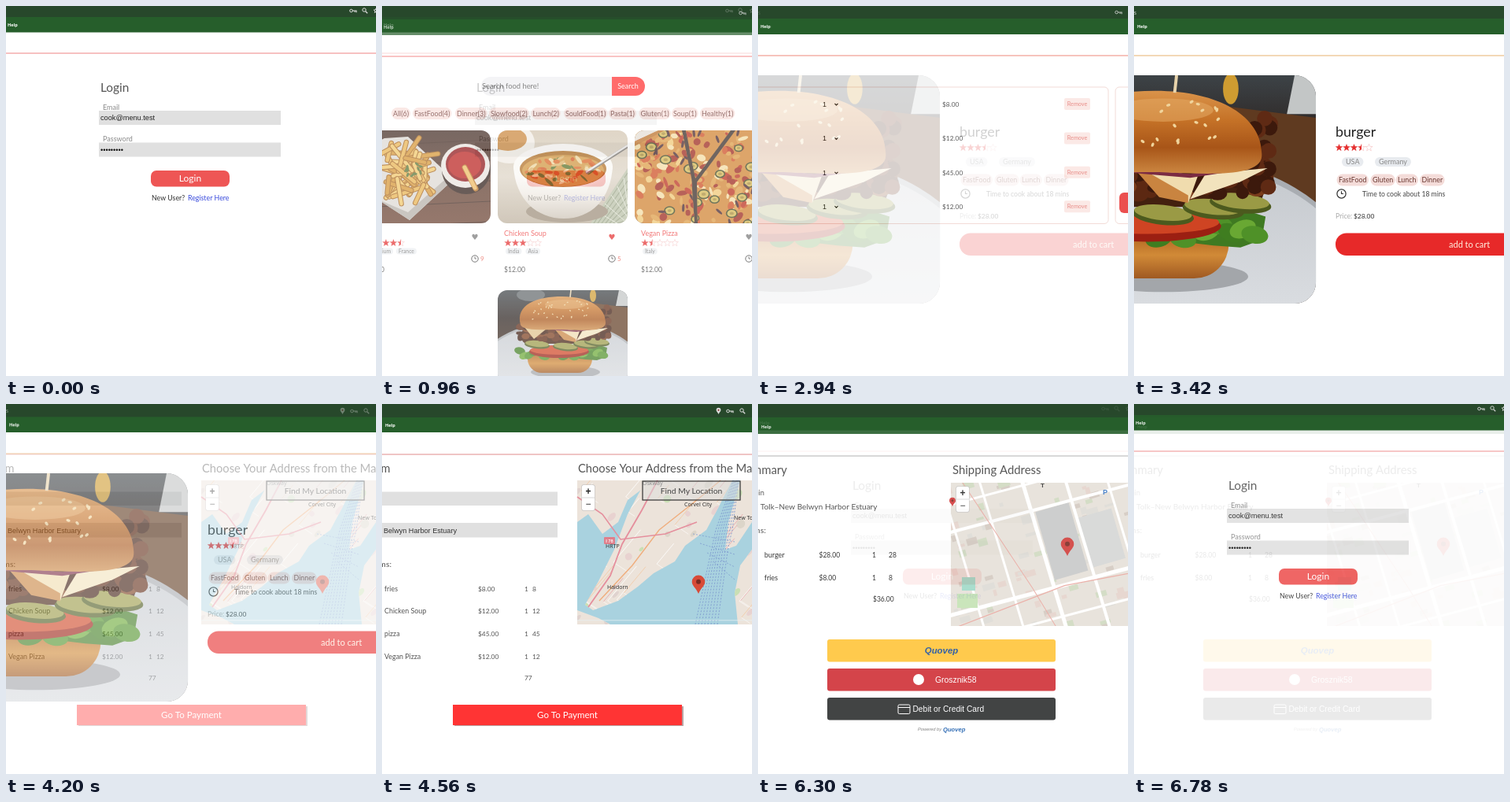
These frames come from a looping animation (470 px wide and 470 px high, 6840 ms). An HTML page with a canvas:

```html
<!DOCTYPE html>
<html lang="en">
<head>
<meta charset="utf-8">
<title>Food shop tour</title>
<style>
  html, body { margin: 0; width: 100%; height: 100%; overflow: hidden; background: #fff; }
  canvas { display: block; }
</style>
</head>
<body>
<canvas id="stage" width="470" height="470"></canvas>
<script>
const SIZE = 470, HOLD = 600, STEP = 60, SLIDE = 1140;
const UI = 'Lato, sans-serif', ARIAL = '"Liberation Sans", sans-serif';
const RED = '#e52f2f';
let c; // context of the slide being drawn

// ---- drawing helpers ----
function box(x, y, w, h, color, r = 0) {
  c.fillStyle = color;
  c.beginPath();
  c.roundRect(x, y, w, h, r);
  c.fill();
}
function oval(x, y, rx, ry, color, turn = 0) {
  c.fillStyle = color;
  c.beginPath();
  c.ellipse(x, y, rx, ry, turn, 0, 7);
  c.fill();
}
function ring(x, y, r, color, width = 1) {
  c.strokeStyle = color;
  c.lineWidth = width;
  c.beginPath();
  c.arc(x, y, r, 0, 7);
  c.stroke();
}
function trace(points) {
  c.beginPath();
  for (let i = 0; i < points.length; i += 2) c.lineTo(points[i], points[i + 1]);
}
function poly(color, ...points) {
  trace(points);
  c.fillStyle = color;
  c.fill();
}
function line(color, width, ...points) {
  trace(points);
  c.strokeStyle = color;
  c.lineWidth = width;
  c.stroke();
}
function text(str, x, y, size, color, align = 'left', font = UI, style = '') {
  c.font = `${style} ${size}px ${font}`;
  c.textAlign = align;
  c.fillStyle = color;
  c.fillText(str, x, y);
}
function pill(str, x, y, size, color, back, pad, h) {
  c.font = `${size}px ${UI}`;
  box(x - pad, y - h / 2, c.measureText(str).width + pad * 2, h, back, h / 2);
  text(str, x, y + size * .35, size, color);
}
function random(seed) {
  return (a = 0, b = 1) => {
    seed = (seed * 16807) % 2147483647;
    return a + (b - a) * seed / 2147483647;
  };
}
function gradient(y0, y1, ...colors) {
  const g = c.createLinearGradient(0, y0, 0, y1);
  colors.forEach((color, i) => g.addColorStop(i / (colors.length - 1), color));
  return g;
}
function clipped(x, y, w, h, r, draw) {
  c.save();
  c.beginPath();
  c.roundRect(x, y, w, h, r);
  c.clip();
  draw();
  c.restore();
}

// ---- shared parts ----
function header(dark, green, lineY, lineColor, helpX, helpY) {
  box(0, 0, SIZE, SIZE, '#fff');
  box(0, 0, SIZE, green, '#265e2b');
  box(0, 0, SIZE, dark, '#27482b');
  box(0, lineY - .5, SIZE, 1, lineColor);
  text('Help', helpX, helpY, 5.6, '#fff', 'left', '"Open Sans", sans-serif', 'bold');
}
function keyIcon(x, y) {
  ring(x - 2.5, y, 1.8, '#ddd');
  line('#ddd', 1.2, x - 1, y, x + 4, y, x + 4, y + 2.2);
  line('#ddd', 1, x + 2, y, x + 2, y + 2);
}
function lens(x, y) {
  ring(x - 1, y - 1, 2.2, '#ddd');
  line('#ddd', 1.3, x + .7, y + .7, x + 3.2, y + 3.2);
}
function pin(x, y, s, color) {
  c.fillStyle = color;
  c.beginPath();
  c.moveTo(x, y);
  c.bezierCurveTo(x - s * .15, y - s * .35, x - s * .36, y - s * .42, x - s * .36, y - s * .66);
  c.arc(x, y - s * .66, s * .36, Math.PI, 0);
  c.bezierCurveTo(x + s * .36, y - s * .42, x + s * .15, y - s * .35, x, y);
  c.fill();
  oval(x, y - s * .66, s * .13, s * .13, '#7c2a22');
}
function star(x, y, r) {
  const points = [];
  for (let i = 0; i < 10; i++) {
    const a = i * Math.PI / 5 - Math.PI / 2, d = i % 2 ? r * .42 : r;
    points.push(x + d * Math.cos(a), y + d * Math.sin(a));
  }
  trace(points);
  c.closePath();
}
function stars(x, y, r, rating) {
  for (let i = 0; i < 5; i++) {
    const sx = x + i * 9.5, part = Math.min(1, Math.max(0, rating - i));
    star(sx, y, r);
    c.strokeStyle = '#f2b3b3';
    c.lineWidth = .5;
    c.stroke();
    if (part) clipped(sx - r, y - r, 2 * r * part, 2 * r, 0, () => {
      star(sx, y, r);
      c.fillStyle = RED;
      c.fill();
    });
  }
}
function clock(x, y, r) {
  ring(x, y, r, '#333', r / 4.5);
  line('#333', r / 5, x, y - r * .6, x, y, x + r * .45, y);
}
function zoomControl(x, y) {
  box(x - .5, y - .5, 17, 33, '#bbb', 2);
  box(x, y, 16, 32, '#fff', 2);
  box(x, y + 15.6, 16, .8, '#ccc');
  text('+', x + 8, y + 12, 12, '#222', 'center', ARIAL, 'bold');
  text('−', x + 8, y + 28, 12, '#222', 'center', ARIAL);
}

// ---- food pictures, 165 by 118 ----
function fries() {
  const rnd = random(11);
  box(0, 0, 165, 118, gradient(0, 118, '#3f2820', '#5a382a', '#693f2e'));
  for (let y = 12; y < 118; y += 26) line('#3a221a', 1, 0, y + 8, 165, y);
  poly('#dcd8d2', 0, 26, 30, 10, 60, 8, 118, 62, 62, 114, 22, 88, 0, 84);
  poly('#b5afa8', 22, 88, 62, 114, 118, 62, 112, 58, 60, 104);
  c.lineCap = 'round';
  for (let i = 0; i < 46; i++) {
    const x = rnd(34, 82), y = rnd(24, 82), a = rnd(-.6, 2.3), d = rnd(10, 21);
    const ends = [x - d * Math.cos(a), y - d * Math.sin(a), x + d * Math.cos(a), y + d * Math.sin(a)];
    line('#a5641c', 6.5, ...ends);
    line(['#e8b14c', '#d59430', '#f0c566'][i % 3], 4.4, ...ends);
  }
  for (let i = 0; i < 12; i++) oval(rnd(56, 76), rnd(40, 58), 3, 1.5, '#55702f', rnd(0, 3));
  oval(134, 50, 31, 31, '#2a1812');
  oval(133, 45, 31, 28, '#e9e3de');
  oval(133, 43, 25, 22, '#8d1012');
  oval(132, 44, 21, 17, '#b81c19');
  line('#b56f22', 7, 132, 47, 146, 74);
  line('#edb95f', 5, 132, 47, 145, 73);
  c.lineCap = 'butt';
}
function soup() {
  const rnd = random(7);
  box(0, 0, 165, 118, gradient(0, 118, '#d3c5b0', '#ddd4c5', '#bdb09d'));
  oval(15, 16, 32, 26, '#f1ece4');
  oval(13, 11, 24, 15, '#c9863a');
  poly('#b9bfa6', 165, 48, 118, 118, 165, 118);
  for (let i = 0; i < 8; i++) line('#939d80', 1.2, 165, 54 + i * 10, 122 + i * 5, 118);
  for (let i = 0; i < 6; i++) line('#e1e4d4', 1, 128 + i * 8, 104 - i * 11, 165, 126 - i * 8);
  oval(88, 103, 52, 14, '#9c8d78');
  c.fillStyle = gradient(45, 115, '#ffffff', '#f1ece5', '#c9bfb1');
  c.beginPath();
  c.moveTo(20, 45);
  c.bezierCurveTo(22, 88, 50, 112, 84, 112);
  c.bezierCurveTo(118, 112, 144, 88, 146, 45);
  c.fill();
  oval(83, 46, 63, 29, '#faf8f4');
  oval(83, 49, 55, 23, '#b06d20');
  oval(83, 51, 52, 20, '#d0923a');
  for (let i = 0; i < 60; i++) {
    const a = rnd(0, 6.28), d = Math.sqrt(rnd());
    oval(83 + 47 * d * Math.cos(a), 51 + 16 * d * Math.sin(a), rnd(2, 7), rnd(1.2, 2.8),
      ['#ecd49a', '#cf4f16', '#dcb064', '#536d22', '#d8621f'][i % 5], rnd(-1, 1));
  }
  line('#77726c', 4, 112, 54, 165, 20);
  line('#e9e7e5', 2.6, 112, 53, 165, 19);
}
function pizza() {
  const rnd = random(23);
  box(0, 0, 165, 118, '#33251f');
  const slices = [[0, 0, 60, 0, 72, 60, 76, 118, 0, 118], [65, 0, 122, 0, 77, 61],
    [128, 0, 165, 0, 165, 118, 80, 118, 79, 66]];
  for (const slice of slices) {
    poly('#cf7f2c', ...slice);
    c.save();
    trace(slice);
    c.clip();
    for (let i = 0; i < 170; i++)
      oval(rnd(0, 165), rnd(0, 118), rnd(2, 8), rnd(1.5, 5),
        ['#efc670', '#b92a17', '#dc9a40', '#cc4a1c', '#f3dba0', '#9a2013'][i % 6], rnd(0, 3));
    for (let i = 0; i < 24; i++) {
      const x = rnd(0, 165), y = rnd(0, 118), r = rnd(5, 8);
      oval(x, y, r, r * .8, '#353d18');
      oval(x, y, r - 1.6, r * .8 - 1.5, '#d3b64e');
      oval(x, y, r * .35, r * .25, '#a88a34');
    }
    for (let i = 0; i < 20; i++) oval(rnd(0, 165), rnd(0, 118), 5, 1.6, '#3f1f25', rnd(0, 3));
    c.restore();
  }
  poly('#e3dcd2', 0, 0, 30, 0, 0, 14);
  poly('#b96c22', 0, 14, 30, 0, 38, 0, 0, 20);
}
function burger() {
  const rnd = random(5);
  box(0, 0, 165, 118, gradient(0, 70, '#3d4347', '#2a211e', '#3f291c'));
  poly('#5f3a20', 118, 16, 165, 22, 165, 66, 118, 56);
  poly('#c3c6c6', 154, 0, 165, 0, 165, 20, 150, 20);
  oval(121, 7, 4, 8, '#cf9c31');
  oval(42, 6, 18, 8, '#62686b');
  oval(80, 102, 105, 62, '#a9adb2');
  oval(80, 104, 104, 61, gradient(48, 118, '#c5c9ce', '#d9dce0'));
  oval(86, 104, 44, 8, '#a3a6aa');
  // bottom bun
  c.fillStyle = gradient(80, 106, '#a95d1d', '#d18a37', '#9b5520');
  c.beginPath();
  c.roundRect(38, 80, 82, 25, [4, 4, 18, 18]);
  c.fill();
  // lettuce, tomato, pickles
  poly('#3f7a22', 96, 86, 108, 74, 126, 69, 139, 73, 137, 85, 126, 89, 112, 88);
  for (let i = 0; i < 18; i++)
    oval(28 + i * 6.2, 80 + rnd(-3, 5), 7, 4.5, ['#3f7d20', '#69a833', '#4f9128'][i % 3], rnd(-.7, .7));
  oval(78, 78, 38, 8, '#9b1f12');
  oval(78, 76, 37, 6, '#cf4423');
  box(30, 48, 108, 20, '#43200f', 8);
  for (const [x, y] of [[50, 68], [86, 71], [112, 68], [126, 65]]) {
    oval(x, y + 1.5, 16, 4.8, '#4c5a1e', .1);
    oval(x, y, 15, 4, '#9a9a45', .1);
  }
  // fried chicken
  for (let i = 0; i < 90; i++)
    oval(rnd(28, 140), rnd(46, 62), rnd(3, 6), rnd(2, 5), ['#3c190c', '#5c2812', '#7a3c1b'][i % 3]);
  for (let i = 0; i < 26; i++) oval(rnd(130, 142), rnd(22, 60), 4, 4, ['#3c190c', '#5f2a14'][i % 2]);
  // cheese and onion
  poly('#f0dcae', 70, 47, 104, 52, 99, 66);
  poly('#c98440', 70, 47, 78, 50, 99, 62, 99, 66, 84, 63);
  poly('#f2e3bd', 100, 64, 108, 51, 140, 48, 126, 55);
  poly('#e0c28a', 34, 47, 62, 49, 46, 62);
  line('#7b2c43', 2, 50, 47, 76, 50, 100, 52, 126, 48);
  // top bun
  c.fillStyle = gradient(8, 52, '#d9934a', '#c67328', '#a85518', '#cf8c45');
  c.beginPath();
  c.moveTo(29, 44);
  c.bezierCurveTo(22, 18, 50, 8, 82, 8);
  c.bezierCurveTo(116, 8, 138, 22, 137, 42);
  c.bezierCurveTo(136, 53, 108, 51, 84, 50);
  c.bezierCurveTo(58, 50, 32, 52, 29, 44);
  c.fill();
  oval(86, 18, 26, 6, '#e5ab6688');
  for (let i = 0; i < 34; i++) oval(rnd(42, 124), rnd(13, 40), 1.1, .7, '#f0d49c', rnd(0, 3));
  line('#e7d3ab', 1.6, 93, 0, 92, 9);
}
function photo(x, y, scale, radius, draw) {
  clipped(x, y, 165 * scale, 118 * scale, radius, () => {
    c.translate(x, y);
    c.scale(scale, scale);
    draw();
  });
}

// ---- maps ----
function harborMap() {
  const rnd = random(31), land = '#ece3da';
  box(248, 97, 222, 183, '#a9d2df');
  const shores = [
    [248, 97, 345, 97, 312, 122, 300, 150, 280, 165, 262, 140, 248, 150],
    [335, 97, 445, 97, 428, 130, 412, 160, 385, 180, 372, 200, 345, 215, 325, 232, 300, 250, 268, 262, 258, 255, 275, 225, 295, 185, 312, 140],
    [470, 97, 455, 97, 440, 150, 436, 185, 450, 180, 470, 150],
    [470, 185, 455, 205, 448, 240, 452, 280, 470, 280],
    [248, 262, 275, 272, 290, 280, 248, 280]];
  for (const shore of shores) {
    poly(land, ...shore);
    c.save();
    trace(shore);
    c.clip();
    for (let i = 0; i < 40; i++) {
      const x = rnd(248, 470), y = rnd(97, 280);
      oval(x, y, rnd(3, 9), rnd(2, 6), ['#e0d3cf', '#dcd5c9', '#c9dfb4', '#e8d2d0'][i % 4], -.8);
    }
    for (let i = 0; i < 30; i++) {
      const x = rnd(248, 470), y = rnd(97, 280), d = rnd(10, 40);
      line(['#fff', '#f3c8a3', '#e6a3a6'][i % 3], .8, x, y, x + d, y - d * 1.2);
      line('#fff', .6, x, y, x + d * .6, y + d * .4);
    }
    c.restore();
  }
  line('#e58f9d', 1.8, 262, 258, 290, 218, 305, 178, 330, 135, 350, 97);
  line('#f0ae7d', 1.4, 276, 250, 318, 205, 352, 160, 400, 122, 430, 97);
  line('#e58f9d', 1.6, 248, 118, 280, 140, 303, 172, 360, 165, 400, 150);
  c.setLineDash([2, 2]);
  for (let i = 0; i < 8; i++) line('#7e9bd0', .9, 398 + i * 4, 280, 412 + i * 4, 215 - i * 5, 424 + i * 3, 160, 446 + i, 97);
  for (let i = 0; i < 4; i++) line('#7e9bd0', .8, 395 + i * 9, 165 + i * 12, 448, 175 + i * 16);
  c.setLineDash([]);
  box(248, 274.5, 222, .8, '#e8f2f4');
  box(282, 169, 14, 9, '#e07f8b', 1);
  text('I 78', 289, 176, 5.5, '#fff', 'center', UI, 'bold');
  const label = (str, x, y) => text(str, x, y, 7, '#333', 'left', '"Noto Sans", sans-serif');
  label('Corvel City', 384, 130);
  label('New Tolk', 447, 147);
  label('Haldorn', 286, 235);
  label('Oskway', 331, 103);
  label('HRTP', 284, 183);
  pin(402, 241, 23, '#d84a38');
  zoomControl(254, 103);
  box(331, 98, 124, 24, '#dddddd88');
  c.strokeStyle = '#333';
  c.lineWidth = 1.2;
  c.strokeRect(331, 98, 124, 24);
  text('Find My Location', 393, 114, 10.3, '#444', 'center');
}
function townMap() {
  const rnd = random(17);
  box(245, 100, 225, 182, '#e6e0d8');
  clipped(245, 100, 225, 182, 0, () => {
    c.translate(357, 190);
    c.rotate(-.28);
    for (let i = 0; i < 130; i++)
      box(rnd(-135, 125), rnd(-130, 120), rnd(4, 16), rnd(3, 11), ['#d3c9c0', '#dddbd5', '#cfd9c0', '#e5d3cb'][i % 4]);
    box(10, -52, 44, 90, '#c8c9c9');
    box(58, -30, 46, 66, '#d5d6d5');
    for (const [y, w] of [[-58, 4], [44, 5], [82, 3], [-92, 3]]) line('#fff', w, -150, y, 150, y + 6);
    for (const [x, w] of [[4, 5], [57, 4], [-48, 3], [-96, 3], [108, 3]]) line('#fff', w, x, -150, x + 4, 150);
    line('#e9a8a0', 1.2, -150, 63, 20, 48, 150, 60);
    line('#e9a8a0', 1, -80, -150, -20, 40, 10, 150);
  });
  box(259, 220, 17, 17, '#9fd9c8');
  box(253, 241, 26, 18, '#c4e2b4');
  text('P', 438, 115, 9, '#3977c4', 'left', ARIAL, 'bold');
  text('T', 359, 106, 8, '#333', 'left', ARIAL, 'bold');
  pin(247, 130, 11, '#d23b3b');
  pin(393, 193, 23, '#cf3d3a');
  zoomControl(252, 105);
}

// ---- slides ----
function login() {
  header(14, 33.5, 60, '#f08484', 2, 26);
  keyIcon(441, 6);
  lens(456, 6);
  star(470, 6, 3);
  c.strokeStyle = '#ddd';
  c.lineWidth = 1;
  c.stroke();
  text('Login', 120, 108.5, 15.4, '#555');
  text('Email', 123, 131.5, 9, '#8a8a8a');
  box(118, 133, 231, 18, '#e0e0e0');
  text('cook@menu.test', 120, 145, 9.2, '#222', 'left', ARIAL);
  text('Password', 123, 171.5, 9, '#8a8a8a');
  box(118, 173.5, 231, 18, '#e0e0e0');
  text('•'.repeat(9), 120, 186, 9.2, '#111', 'left', ARIAL);
  box(184, 209, 100, 20.5, '#ee5655', 7);
  text('Login', 234, 223, 12, '#fff', 'center');
  text('New User?', 185, 246.5, 8.8, '#333');
  text('Register Here', 231, 246.5, 8.8, '#3a4bdc');
}
function menu() {
  header(17, 37, 64, '#f05a5a', 2, 29);
  keyIcon(458, 9);
  box(126, 90, 166, 24, '#f0f0f3', [12, 0, 0, 12]);
  box(292, 90, 42, 24, '#ff2d2d', [0, 12, 12, 0]);
  text('Search food here!', 127, 105, 9.4, '#555');
  text('Search', 312.5, 105, 9, '#fff', 'center');
  const tags = { 'All(6)': 14, 'FastFood(4)': 41, 'Dinner(3)': 95, 'Slowfood(2)': 138, 'Lunch(2)': 191.5,
    'SouldFood(1)': 233, 'Pasta(1)': 290, 'Gluten(1)': 328.5, 'Soup(1)': 370, 'Healthy(1)': 406 };
  for (const tag in tags) pill(tag, tags[tag], 136.5, 8.9, '#6e3833', '#f8dfdb', 2, 15);
  const cards = [
    ['Fries', fries, 4.5, '#777', 9, '$8.00', [['Belgium', -13], ['France', 21]]],
    ['Chicken Soup', soup, 3, RED, 5, '$12.00', [['India', 160], ['Asia', 185.5]]],
    ['Vegan Pizza', pizza, 1.5, '#777', 7, '$12.00', [['Italy', 334]]]];
  cards.forEach(([name, picture, rating, heart, minutes, price, lands], i) => {
    const x = -27 + 174 * i;
    photo(x, 158, 1, 12, picture);
    text(name, x + 8, 291.5, 9, '#ee4343');
    text('♥', x + 145, 297, 10, heart, 'center', '"DejaVu Sans", sans-serif');
    stars(x + 13, 301, 4.7, rating);
    for (const [land, lx] of lands) pill(land, lx, 311.5, 6.8, '#777', '#eceef1', 3, 8);
    clock(x + 145, 321, 4.2);
    text(minutes, x + 152, 324, 8, '#e8594d');
    text(price, x + 8, 338, 8.6, '#444');
  });
  photo(147, 361, 1, 12, burger);
}
function cart() {
  header(16, 36, 63, '#f08080', 3, 28);
  keyIcon(458, 8);
  c.strokeStyle = '#f0d3cd';
  c.lineWidth = 1;
  for (const x of [-20, 454]) {
    c.beginPath();
    c.roundRect(x, 103, 465, 173.5, 5);
    c.stroke();
  }
  ['$8.00', '$12.00', '$45.00', '$12.00'].forEach((price, i) => {
    const y = 128 + i * 43.4;
    text('1', 82, y, 9, '#111', 'left', ARIAL);
    line('#111', 1.1, 97.5, y - 4, 99.5, y - 2, 101.5, y - 4);
    text(price, 234, y, 8.4, '#333');
    box(389, y - 11, 33, 15, '#fbe4e0', 2);
    text('Remove', 405.5, y - 1, 7.2, '#e2706a', 'center');
  });
  box(459, 237, 60, 26, '#e62323', 6);
}
function detail() {
  header(16, 36, 63, '#e8b271', 4, 28);
  text('s', 0, 11, 7, '#ddd');
  photo(-174.5, 88, 2.458, 27, burger);
  text('burger', 256, 166, 17.8, '#222');
  stars(260.5, 180, 4.8, 3.5);
  pill('USA', 269, 198, 9, '#888', '#e8ebef', 5, 12);
  pill('Germany', 311, 198, 9, '#888', '#e8ebef', 5, 12);
  for (const [tag, x] of [['FastFood', 260], ['Gluten', 303], ['Lunch', 335], ['Dinner', 365.5]])
    pill(tag, x, 221, 8.9, '#6b3a34', '#f4dcd9', 2.5, 15);
  clock(263.5, 238.5, 5.6);
  text('Time to cook about 18 mins', 290, 242, 8.6, '#444');
  text('Price:', 256, 270, 8.7, '#aaa');
  text('$28.00', 279, 270, 8.4, '#333');
  box(256, 288.5, 330, 28.5, '#e72929', 14);
  text('add to cart', 400, 306.5, 11, '#fff0e0');
}
function address() {
  header(17, 36, 64, '#e08c8c', 4, 28.5);
  pin(427.5, 13, 8, '#ddd');
  keyIcon(442, 9);
  lens(458, 9);
  text('Order Form', 10.5, 86.5, 14.6, '#555', 'right');
  text('Choose Your Address from the Map', 249, 86.5, 14.7, '#555');
  box(-5, 111.5, 228, 17.5, '#e0e0e0');
  box(-5, 151, 228, 18.5, '#e0e0e0');
  text('Belwyn Harbor Estuary', 2, 163.5, 9.1, '#333', 'left', ARIAL);
  text('Items:', 12, 207, 10.4, '#555', 'right');
  [['fries', 8], ['Chicken Soup', 12], ['pizza', 45], ['Vegan Pizza', 12]].forEach(([name, price], i) => {
    const y = 237.5 + i * 28.8;
    text(name, 3, y, 8.9, '#555');
    text(`$${price}.00`, 122, y, 8.4, '#555');
    text('1', 181, y, 8.4, '#555');
    text(price, 191, y, 8.4, '#555');
  });
  text('77', 181, 351, 8.4, '#555');
  harborMap();
  box(92, 384, 291, 25, '#b9a3a3');
  box(90, 382, 291, 26, '#ff3434');
  text('Go To Payment', 235.5, 399, 11.5, '#fff', 'center');
}
function payment() {
  header(17, 38, 66, '#aaa', 4, 30.5);
  text('Order Summary', 37, 89, 14.8, '#444', 'right');
  text('Shipping Address', 247, 89, 14.9, '#444');
  text('Robin', 8, 116, 9.4, '#444', 'right');
  text('Tolk–New Belwyn Harbor Estuary', 3, 134, 10, '#444');
  text('Items:', 10, 164, 10.4, '#444', 'right');
  [['burger', 28], ['fries', 8]].forEach(([name, price], i) => {
    const y = 195 + i * 28.5;
    text(name, 8, y, 9, '#222');
    text(`$${price}.00`, 77.5, y, 8.5, '#222');
    text('1', 145, y, 8.5, '#222');
    text(price, 166, y, 8.5, '#222');
  });
  text('$36.00', 146, 251, 8.5, '#222');
  townMap();
  const button = (y, color) => box(88, y, 290, 28.5, color, 3);
  const brand = 'Quovep', bold = 'italic bold';
  button(299, '#ffc439');
  text(brand, 233, 317, 11.4, '#1d4f9c', 'center', ARIAL, bold);
  button(336, '#d02e35');
  oval(204, 350, 7, 7, '#fff');
  text('Grosznik58', 225, 353.5, 10.4, '#fff', 'left', ARIAL);
  button(373, '#2c2e2f');
  c.strokeStyle = '#fff';
  c.lineWidth = 1;
  c.beginPath();
  c.roundRect(178, 382, 15, 11.5, 1.5);
  c.stroke();
  line('#fff', 1, 178, 385.5, 193, 385.5);
  text('Debit or Credit Card', 196.5, 390.5, 10.2, '#fff', 'left', ARIAL);
  text('Powered by', 203, 415, 5.7, '#777', 'left', ARIAL, 'italic');
  text(brand, 235, 415.5, 7.6, '#1d5fae', 'left', ARIAL, bold);
}

const slides = [login, menu, cart, detail, address, payment].map(draw => {
  const canvas = document.createElement('canvas');
  canvas.width = canvas.height = SIZE;
  c = canvas.getContext('2d');
  draw();
  return canvas;
});

// Each slide holds, then the next one fades in over it in ten steps.
const stage = document.getElementById('stage').getContext('2d');
function frame() {
  const now = performance.now(), index = Math.floor(now / SLIDE), local = now % SLIDE;
  stage.globalAlpha = 1;
  stage.drawImage(slides[index % slides.length], 0, 0);
  if (local >= HOLD) {
    stage.globalAlpha = (Math.floor((local - HOLD) / STEP) + 1) / 10;
    stage.drawImage(slides[(index + 1) % slides.length], 0, 0);
  }
  requestAnimationFrame(frame);
}
frame();
</script>
</body>
</html>
```
